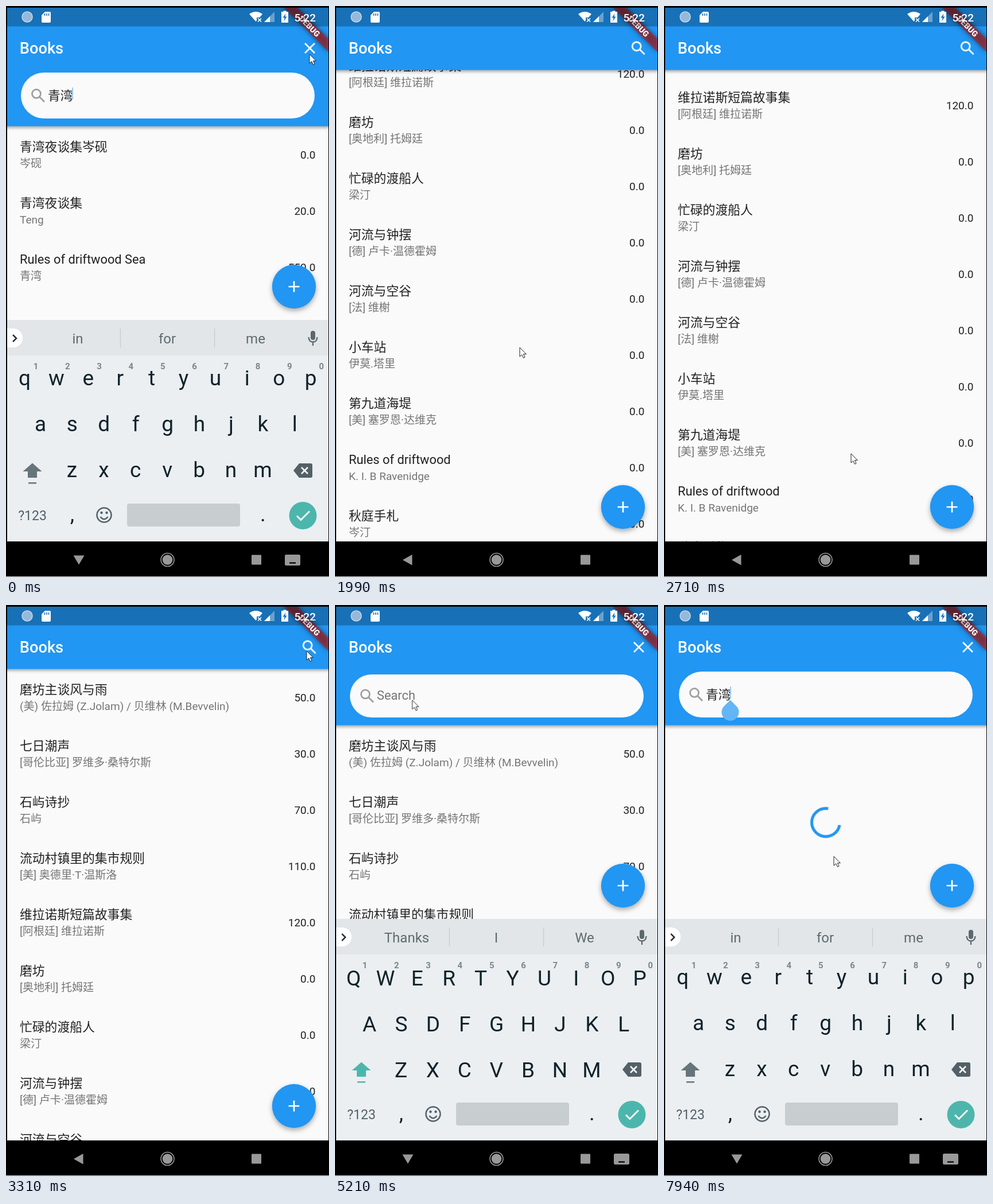
An HTML page that plays this animation: 563x995 px, repeating every 8000 ms.

```html
<!DOCTYPE html>
<html lang="zh-CN">
<head>
<meta charset="utf-8">
<title>Books</title>
<style>
html, body { margin: 0; width: 100%; height: 100%; overflow: hidden; background: #000; }
svg { display: block; width: 100%; height: 100%; font-family: Roboto, "Noto Sans CJK SC", "Noto Sans CJK", "Noto Sans CJK JP", sans-serif; }
text { white-space: pre; }
.mid { text-anchor: middle; }
.end { text-anchor: end; }
.line { fill: none; stroke: currentColor; }

.title { font-size: 21.8px; fill: #212121; }
.author { font-size: 19.05px; fill: #757575; }
.price { font-size: 19.05px; fill: #212121; }
.key { font-size: 37px; fill: #10222b; }
.hint { font-size: 15px; font-weight: 700; fill: #7b868b; }
.word { font-size: 24px; fill: #5f6b70; }

/* one loop is 8 s, so 1% is 80 ms */
.cut { animation: 8s step-end infinite; }
.glide { animation: 8s linear infinite; }

.searching { animation-name: searching; }
.browsing { animation-name: browsing; }
.typed { animation-name: typed; }
.untyped { animation-name: untyped; }
.docked { animation-name: docked; }
.undocked { animation-name: undocked; }
.words { animation-name: words; }
.openers { animation-name: openers; }
.results { animation-name: results; }
.shelf { animation-name: shelf; }
.loading { animation-name: loading; }
.bar { animation-name: bar; }
.fab { animation-name: fab; filter: drop-shadow(0 4px 4.5px rgba(0,0,0,.32)); }
.caret { animation-name: caret; }
.caret0 { animation-name: caret0; }
.scroll { animation-name: scroll; }
.board { animation-name: board; }
.pointer { animation-name: pointer; }
.handle { animation-name: handle; }
.glow { animation-name: glow; transform-origin: 282px 933px; }
.ripple { animation-name: ripple; transform-origin: 529px 73px; }
.spin { animation-name: spin; transform-origin: 282px 379px; }
.sweep { animation-name: sweep; }

@keyframes searching { 0% { opacity: 1 } 11.875% { opacity: 0 } 44.5%, 100% { opacity: 1 } }
@keyframes browsing { 0% { opacity: 0 } 11.875% { opacity: 1 } 44.5%, 100% { opacity: 0 } }
@keyframes typed { 0% { opacity: 1 } 11.875% { opacity: 0 } 69.375%, 100% { opacity: 1 } }
@keyframes untyped { 0% { opacity: 0 } 11.875% { opacity: 1 } 69.375%, 100% { opacity: 0 } }
@keyframes docked { 0% { opacity: 1 } 13% { opacity: 0 } 52.75%, 100% { opacity: 1 } }
@keyframes undocked { 0% { opacity: 0 } 13% { opacity: 1 } 52.75%, 100% { opacity: 0 } }
@keyframes words { 0% { opacity: 1 } 16.25% { opacity: 0 } 69.375%, 100% { opacity: 1 } }
@keyframes openers { 0% { opacity: 0 } 16.25% { opacity: 1 } 69.375%, 100% { opacity: 0 } }
@keyframes results { 0% { opacity: 1 } 11.875%, 100% { opacity: 0 } }
@keyframes shelf { 0% { opacity: 0 } 11.875% { opacity: 1 } 92.875%, 100% { opacity: 0 } }
@keyframes loading { 0% { opacity: 0 } 92.875%, 100% { opacity: 1 } }
@keyframes bar { 0% { transform: translateY(98px) } 11.875% { transform: none } 44.5%, 100% { transform: translateY(98px) } }
@keyframes fab { 0% { transform: translateY(-384px) } 13% { transform: none } 52.75%, 100% { transform: translateY(-384px) } }
@keyframes caret { 0% { opacity: 1 } .375% { opacity: 0 } 6.375% { opacity: 1 } 81.875% { opacity: 0 } 88.125%, 100% { opacity: 1 } }
@keyframes caret0 { 0% { opacity: 0 } 52.5% { opacity: 1 } 61.75% { opacity: 0 } 68%, 100% { opacity: 1 } }
@keyframes scroll {
  0%, 20.5% { transform: none }
  23.75% { transform: translateY(-265px); animation-timing-function: cubic-bezier(.25,.45,.5,1) }
  29.5%, 31.25% { transform: translateY(-741px) }
  33.125% { transform: translateY(-556px); animation-timing-function: cubic-bezier(.25,.45,.5,1) }
  37.5%, 44.49% { transform: none }
  44.5%, 100% { transform: translateY(98px) }
}
@keyframes board {
  0%, 13% { transform: none; opacity: 1 }
  14% { transform: translateY(36px); opacity: .5 }
  15%, 52.75% { transform: translateY(80px); opacity: 0 }
  53.75% { transform: translateY(8.7px); opacity: .9 }
  54.25%, 100% { transform: none; opacity: 1 }
}
@keyframes pointer {
  0%, 2.99% { transform: translate(529px,84px) }
  3%, 5.24% { transform: translate(528px,81px) }
  5.25%, 6.37% { transform: translate(528px,79px) }
  6.375%, 15% { transform: translate(527px,78px) }
  19.75%, 20.5% { transform: translate(330px,860px) }
  23.75%, 31.25% { transform: translate(322px,595px) }
  33.125%, 34% { transform: translate(326px,780px) }
  38.5%, 40.625% { transform: translate(524px,67px) }
  41.375%, 44.5% { transform: translate(524px,80px) }
  47.25%, 49.875% { transform: translate(126px,160px) }
  52.5%, 64.375% { transform: translate(126px,165px) }
  72.5%, 76.75% { transform: translate(218px,172px) }
  80%, 81.875% { transform: translate(380px,455px) }
  86.25% { transform: translate(436px,720px) }
  91.75%, 92.875% { transform: translate(400px,640px) }
  98.75%, 100% { transform: translate(296px,438px) }
}
@keyframes handle { 0%, 76.2% { opacity: 0 } 78%, 100% { opacity: 1 } }
@keyframes glow {
  0%, 29.25% { transform: scaleY(0); opacity: 0 }
  30.4%, 30.7% { transform: none; opacity: .1 }
  33%, 100% { transform: scaleY(0); opacity: 0 }
}
@keyframes ripple {
  0%, 9.87% { transform: scale(.2); opacity: 0 }
  9.875% { transform: scale(.2); opacity: .25 }
  11.8% { transform: none; opacity: .25 }
  13.5% { transform: none; opacity: 0 }
  41.6% { transform: scale(.2); opacity: 0 }
  41.7% { transform: scale(.2); opacity: .25 }
  44.5% { transform: none; opacity: .25 }
  46.5%, 100% { transform: none; opacity: 0 }
}
@keyframes spin { 0%, 91.5% { transform: rotate(-90deg) } 100% { transform: rotate(20deg) } }
@keyframes sweep {
  0%, 91.5% { stroke-dasharray: 0 100; animation-timing-function: cubic-bezier(.4,0,.2,1) }
  99.83%, 100% { stroke-dasharray: 75 100 }
}
</style>
</head>
<body>
<svg viewBox="0 0 563 995">
  <defs>
    <clipPath id="screen"><path d="M2 3H562V933H2Z"/></clipPath>
    <clipPath id="glass"><path d="M2 3H562V994H2Z"/></clipPath>
    <path id="ribbon" d="M482 0L562 80V57L505 0Z"/>
    <g id="lens" class="line" transform="scale(1.3625)" stroke-width="2">
      <circle cx="9.5" cy="9.5" r="5.5"/><path d="M13.6 13.6L19.8 19.8"/>
    </g>
  </defs>
  <path d="M0 0H563V995H0Z"/>
  <path d="M0 994H563V995H0Z" fill="#d8d8d8"/>

  <g clip-path="url(#screen)">
    <path d="M2 2H562V933H2Z" fill="#fafafa"/>
    <g class="cut shelf"><g id="books" class="glide scroll"></g></g>
    <g id="found" class="cut results" transform="translate(0 98)"></g>
    <g class="cut loading"><g class="glide spin">
      <circle class="line glide sweep" cx="282" cy="379" r="24.5" color="#2196f3" stroke-width="5" pathLength="100"/>
    </g></g>
    <path class="glide glow" d="M2 933V912Q282 884 562 912V933Z" fill="#2196f3"/>
    <path class="cut docked" d="M2 547H562V933H2Z" fill="#fafafa"/>

    <g style="filter:drop-shadow(0 3px 2.5px rgba(0,0,0,.32))">
      <path class="cut bar" d="M-8 -110H572V111.5H-8Z" fill="#2196f3"/>
    </g>
    <text x="23.8" y="83" font-size="27.2" font-weight="500" fill="#fff">Books</text>
    <circle class="glide ripple" cx="529" cy="73" r="46" fill="#fff"/>
    <g color="#fff">
      <g class="cut browsing"><use href="#lens" x="512.7" y="57.3"/></g>
      <path class="cut searching line" d="M521 65L538 82M538 65L521 82" stroke-width="2.7"/>
    </g>

    <g class="cut searching">
      <g class="cut untyped">
        <rect x="26" y="121" width="512" height="75" rx="37.5" fill="#fafafa"/>
        <use href="#lens" x="40" y="142.5" color="#9e9e9e"/>
        <text x="73" y="164.5" font-size="21.8" fill="#757575">Search</text>
        <path class="cut caret0" d="M73 147h1.8v21h-1.8z" fill="#8ec4f0"/>
      </g>
      <g class="cut typed">
        <rect x="26" y="116" width="512" height="80" rx="40" fill="#fafafa"/>
        <use href="#lens" x="40" y="140" color="#9e9e9e"/>
        <text class="title" x="73" y="164">青湾</text>
        <path class="cut caret" d="M115 142h1.8v21h-1.8z" fill="#8ec4f0"/>
      </g>
      <path class="glide handle" d="M115.5 165.5L126 176A15 15 0 1 1 105 176Z" fill="#64b5f6"/>
    </g>

    <g class="cut fab">
      <circle cx="502" cy="873" r="38.2" fill="#2196f3"/>
      <path class="line" d="M492.5 873H511.5M502 863.5V882.5" color="#fff" stroke-width="2.7"/>
    </g>

    <use href="#ribbon" fill-opacity=".5" style="filter:blur(4px)"/>
    <use href="#ribbon" fill="#b71c1c" fill-opacity=".63"/>
    <text class="mid" transform="translate(529.3 35.5) rotate(45)" y="4.9" font-size="13.9" font-weight="900" fill="#fff">DEBUG</text>
    <path d="M2 2H562V35.5H2Z" fill-opacity=".25"/>
    <g fill="#fff">
      <circle cx="37" cy="19" r="9" fill="#94b9db" stroke="#c3d8ea" stroke-width="1.5"/>
      <path d="M68 10H76Q78 10 78 12V27Q78 29 76 29H64Q62 29 62 27V16Z"/>
      <path d="M67.5 13v4M71 13v4M74.5 13v4" stroke="#1971b6" stroke-width="1.6"/>
      <path d="M424 14Q435.5 6 447 14L442 20H437V25L435.5 27Z"/>
      <path class="line" d="M439 21.5L445 27.5M445 21.5L439 27.5" stroke-width="1.7" color="#fff"/>
      <path d="M468 10V28H450Z" fill-opacity=".35"/><path d="M460 18V28H450Z"/>
      <path d="M483.5 10V8.5H488.5V10H492V29H480V10Z"/>
      <path d="M487.5 13L482.5 20.5H485.5L484.5 26.5L489.5 18.5H486.5Z" fill="#1971b6"/>
      <text x="502.5" y="26.5" font-size="19" font-weight="500">5:22</text>
    </g>
  </g>

  <g clip-path="url(#glass)">
    <g class="glide board">
      <path d="M2 547H562V933H2Z" fill="#ebeff1"/>
      <path d="M2 547H562V609H2Z" fill="#e2e6e8"/>
      <path d="M199.5 562V595M363.5 562V595" stroke="#c9ced1" stroke-width="1.5"/>
      <path d="M2 562H12.5A16.5 16.5 0 0 1 12.5 595H2Z" fill="#fff"/>
      <path class="line" d="M12 573L18 579L12 585" color="#263238" stroke-width="2.5"/>
      <g color="#5b686e">
        <rect x="531" y="566" width="8" height="16" rx="4" fill="#5b686e"/>
        <path class="line" d="M527.5 577Q528 585.5 535 585.5T542.5 577M535 585V592" stroke-width="2.3"/>
      </g>
      <g id="words" class="cut words"></g>
      <g id="openers" class="cut openers"></g>
      <g id="digits"></g>
      <g id="lower" class="cut typed"></g>
      <g id="upper" class="cut untyped"></g>
      <path d="M511 797H531Q534 797 534 800V819Q534 822 531 822H511L501 809.5Z" fill="#546067"/>
      <path class="line" d="M515 804L526 815M526 804L515 815" color="#fff" stroke-width="2.5"/>
      <text class="mid" x="46" y="896" font-size="23" fill="#52616a">?123</text>
      <text class="mid key" x="115.5" y="898">,</text>
      <text class="mid key" x="448" y="898">.</text>
      <g color="#52616a" stroke-width="2.5">
        <circle class="line" cx="171" cy="887" r="12.5"/>
        <path class="line" d="M164.5 890Q171 898.5 177.5 890"/>
        <circle cx="166.5" cy="883" r="2.2" fill="#52616a"/><circle cx="175.5" cy="883" r="2.2" fill="#52616a"/>
      </g>
      <rect x="211" y="867" width="197" height="40" rx="4" fill="#c8cdd0"/>
      <circle cx="517.5" cy="888" r="24" fill="#4db6ac"/>
      <path class="line" d="M507 888.5L514 895.5L529 880.5" color="#fff" stroke-width="2.8"/>
    </g>
    <g fill="#999" color="#999">
      <path class="cut undocked" d="M134.5 956V974.5L118 965.2Z"/>
      <g class="cut docked">
        <path d="M117.5 957.5H136.5L127 973.5Z"/>
        <rect x="486" y="956" width="27" height="19" rx="2.5"/>
        <path class="line" d="M489.5 961H510M489.5 965.5H510" stroke="#000" stroke-width="2.3" stroke-dasharray="2.5 2"/>
        <path d="M494 970.5H505" stroke="#000" stroke-width="2.3"/>
      </g>
      <circle class="line" cx="281.5" cy="965" r="11.5" stroke-width="1.6"/>
      <circle cx="281.5" cy="965" r="8.8"/>
      <rect x="428" y="956.5" width="17" height="17" rx="1"/>
    </g>
    <path class="glide pointer" d="M0 0V16L3.8 12.6L6.4 18.3L9 17.1L6.5 11.6H11.3Z" fill="#fff" stroke="#222" stroke-width="1"/>
  </g>
</svg>
<script>
const books = [
  ["磨坊主谈风与雨", "(美) 佐拉姆 (Z.Jolam) / 贝维林 (M.Bevvelin)", 50],
  ["七日潮声", "[哥伦比亚] 罗维多·桑特尔斯", 30],
  ["石屿诗抄", "石屿", 70],
  ["流动村镇里的集市规则", "[美] 奥德里·T·温斯洛", 110],
  ["维拉诺斯短篇故事集", "[阿根廷] 维拉诺斯", 120],
  ["磨坊", "[奥地利] 托姆廷", 0],
  ["忙碌的渡船人", "梁汀", 0],
  ["河流与钟摆", "[德] 卢卡·温德霍姆", 0],
  ["河流与空谷", "[法] 维榭", 0],
  ["小车站", "伊莫.塔里", 0],
  ["第九道海堤", "[美] 塞罗恩·达维克", 0],
  ["Rules of driftwood", "K. I. B Ravenidge", 0],
  ["秋庭手札", "岑汀", 0],
  ["青湾夜谈集岑砚", "岑砚", 0],
  ["青湾夜谈集", "Teng", 20],
  ["Rules of driftwood Sea", "青湾", 550]
];
const fill = (id, html) => { document.getElementById(id).innerHTML = html; };
const label = (cls, x, y, s) => `<text class="${cls}" x="${x}" y="${y}">${s}</text>`;

const rows = list => list.map(([title, author, price], i) => {
  const y = 98 * i;
  return label("title", 24, 155 + y, title) + label("author", 24, 183 + y, author) +
    label("price end", 539.5, 168 + y, price.toFixed(1));
}).join("");
fill("books", rows(books));
fill("found", rows(books.slice(-3)));

const pitch = 55.4;
const letters = ["qwertyuiop", "asdfghjkl", "zxcvbnm"];
const starts = [32.5, 60, 115];
const keys = (lines, base) => lines.map((line, r) =>
  [...line].map((c, i) => label("key mid", starts[r] + pitch * i, base + 80 * r, c)).join("")).join("");
const shift = color =>
  `<path d="M46 796.5L62.5 811H54V822H38V811H29.5ZM39 830H53V832.5H39Z" fill="${color}"/>`;
fill("lower", keys(letters, 660.5) + shift("#66757b"));
fill("upper", keys(letters.map(s => s.toUpperCase()), 663) + shift("#4db6ac"));
fill("digits", [..."1234567890"].map((d, i) => label("hint mid", 52 + 55.3 * i, 632.5, d)).join(""));

const suggest = list => list.map((w, i) => label("word mid", [125, 281, 435][i], 588, w)).join("");
fill("words", suggest(["in", "for", "me"]));
fill("openers", suggest(["Thanks", "I", "We"]));
</script>
</body>
</html>
```
